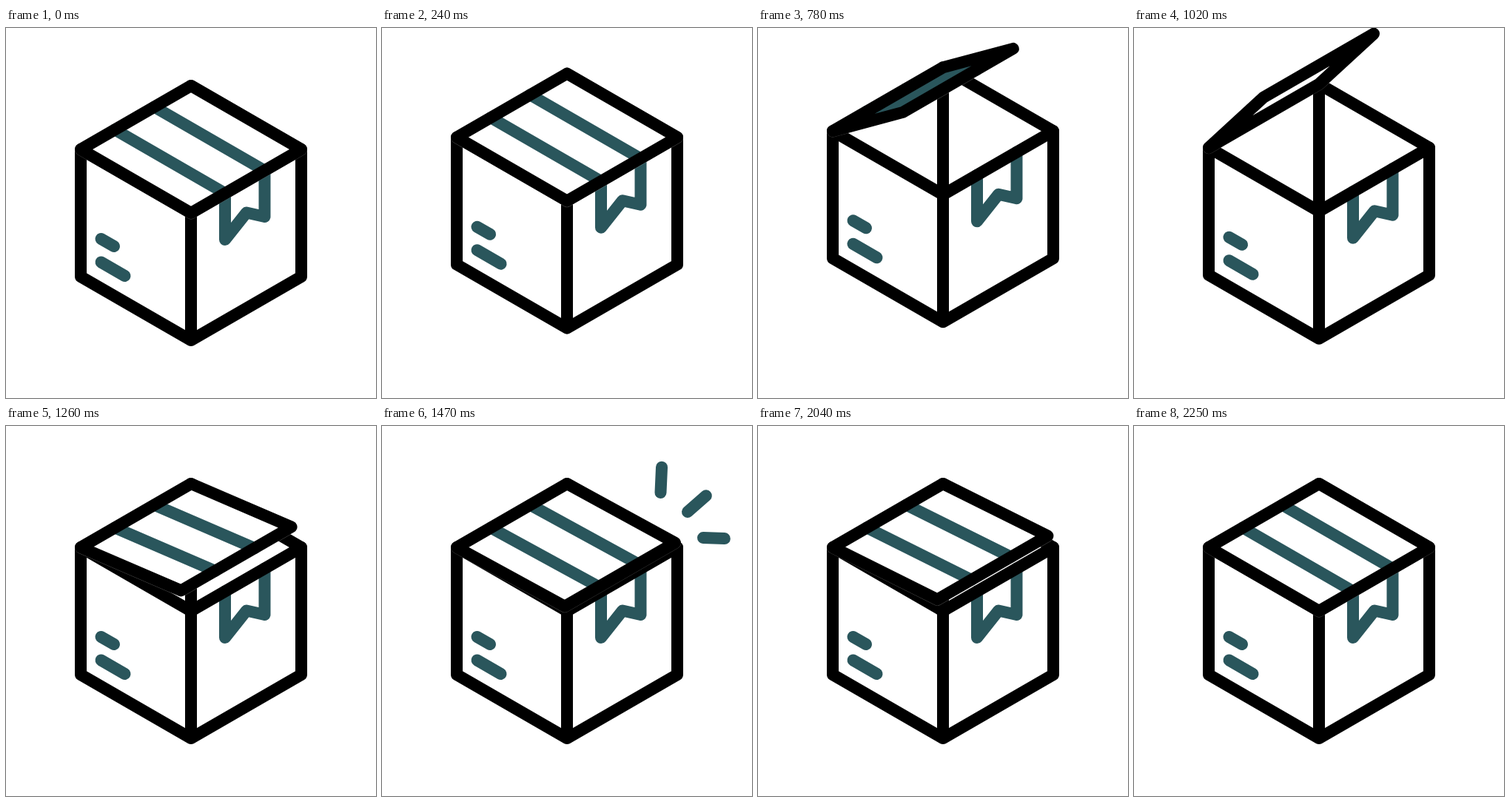
Animation of 500x500 px, one loop 3600 ms. Source, as an HTML page:

```html
<!DOCTYPE html>
<html lang="en">
<head>
<meta charset="utf-8">
<title>Parcel</title>
<style>
  html, body { margin: 0; width: 100%; height: 100%; overflow: hidden; background: #fff; }
  svg { display: block; width: 100%; height: 100%; }
  path { fill: none; stroke: #000; stroke-width: 16; stroke-linecap: round; stroke-linejoin: round; }
  .accent { stroke: #2a565c; }
  #seam { stroke: #fff; stroke-width: 16.8; stroke-opacity: .28; }
  #lidFill { fill: #fff; stroke: none; }
</style>
</head>
<body>
<svg viewBox="0 0 500 500">
  <g id="box">
    <path class="accent" d="M128.5 285L146 295M128.5 316.5L160.5 335"/>
    <path class="accent" d="M296 223.4V286L325 249.5L349.5 255V192.5"/>
    <path d="M250 78V250M250 78L399 164"/>
    <path d="M101 164L250 250L399 164V336L250 422L101 336ZM250 250V422"/>
    <path id="seam"/>
    <path id="lidFill"/>
    <path id="tape" class="accent"/>
    <path id="lid"/>
  </g>
  <path id="sparks" class="accent"/>
</svg>
<script>
const LOOP = 3600;
const get = id => document.getElementById(id);
const [box, seam, lidFill, tape, lid, sparks] =
  ["box", "seam", "lidFill", "tape", "lid", "sparks"].map(get);

const left = [101, 164], top_ = [250, 78];
const rays = [
  [[376.5, 90], [378.2, 52]],
  [[413, 116], [440.5, 92]],
  [[434, 151], [466, 152.2]]
];

// [time, value] keys, eased in and out between neighbours
const liftKeys = [[0, 0], [550, -40], [1100, 0]];
const openKeys = [[330, 0], [1020, 1], [1350, 0], [1800, 0.227], [2250, 0]];
const headKeys = [[1350, 0], [1500, 1]];
const tailKeys = [[1490, 0], [1740, 1]];
const EDGE_ON = 0.872;

function ease(keys, t) {
  if (t <= keys[0][0]) return keys[0][1];
  for (let i = 1; i < keys.length; i++) {
    const [t0, a] = keys[i - 1], [t1, b] = keys[i];
    if (t < t1) {
      const s = (t - t0) / (t1 - t0);
      return a + (b - a) * s * s * (3 - 2 * s);
    }
  }
  return keys[keys.length - 1][1];
}

const mix = (a, b, k) => [a[0] + (b[0] - a[0]) * k, a[1] + (b[1] - a[1]) * k];
const add = (a, b) => [a[0] + b[0], a[1] + b[1]];
const segment = (a, b) => `M${a}L${b}`;

function draw(t) {
  box.setAttribute("transform", `translate(0 ${ease(liftKeys, t)})`);

  const open = ease(openKeys, t);
  const flap = [149 - 75 * open, 86 - 154 * open];
  const outline = `M${left}L${top_}L${add(top_, flap)}L${add(left, flap)}Z`;
  for (const el of [seam, lidFill, lid]) el.setAttribute("d", outline);

  // the tape is only on the outer side of the lid
  const strips = [0.309, 0.667].map(k => {
    const start = mix(left, top_, k);
    return segment(start, add(start, flap));
  });
  tape.setAttribute("d", open < EDGE_ON ? strips.join("") : "");

  const head = ease(headKeys, t), tail = ease(tailKeys, t);
  sparks.setAttribute("d", head > tail
    ? rays.map(([a, b]) => segment(mix(a, b, tail), mix(a, b, head))).join("")
    : "");
}

const begin = performance.now();
function tick() {
  draw((performance.now() - begin) % LOOP);
  requestAnimationFrame(tick);
}
draw(0);
requestAnimationFrame(tick);
</script>
</body>
</html>
```
